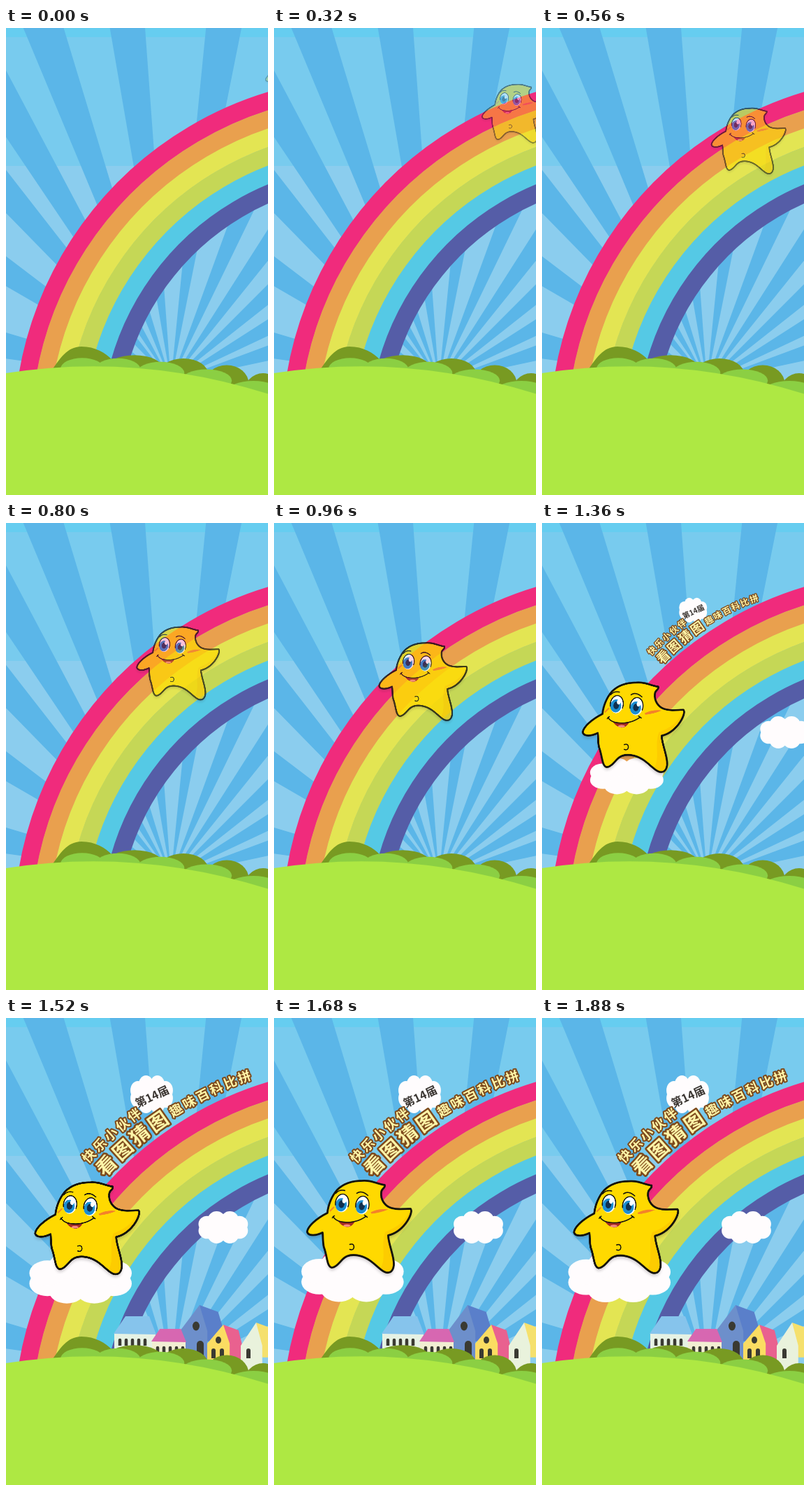
An HTML page with a canvas that plays this animation: 375 px wide and 667 px high, repeating every 3840 ms.

```html
<!DOCTYPE html>
<html lang="zh">
<head>
<meta charset="utf-8">
<style>
html, body { margin: 0; width: 100%; height: 100%; overflow: hidden; background: #78cbee; }
canvas { display: block; width: 375px; height: 667px; }
</style>
</head>
<body>
<canvas id="stage"></canvas>
<script>
const W = 375, H = 667, LOOP = 3840, STEP = 40, END = 1880;
const dpr = window.devicePixelRatio || 1;
const stage = document.getElementById('stage');
stage.width = W * dpr;
stage.height = H * dpr;
const ctx = stage.getContext('2d');
const HUB = { x: 236, y: 505 };
const BOW = { x: 522, y: 581, r: 511, band: 24.9 };
const INK = '#14130c';
const FONT = '"Noto Sans CJK SC", "Noto Sans CJK", "Noto Sans CJK JP", sans-serif';

const rad = deg => deg * Math.PI / 180;
const ramp = (t, from, to) => Math.min(1, Math.max(0, (t - from) / (to - from)));
const ground = x => 483 + 0.00063 * (x - 125) ** 2;

function layer(w, h, scale, paint) {
  const c = document.createElement('canvas');
  c.width = w * scale;
  c.height = h * scale;
  const g = c.getContext('2d');
  g.scale(scale, scale);
  paint(g);
  return c;
}

function shape(g, color, d) {
  g.fillStyle = color;
  g.fill(new Path2D(d));
}

function line(g, color, width, d) {
  g.strokeStyle = color;
  g.lineWidth = width;
  g.stroke(new Path2D(d));
}

function oval(g, color, x, y, rx, ry, turn = 0) {
  g.fillStyle = color;
  g.beginPath();
  g.ellipse(x, y, rx, ry, turn, 0, Math.PI * 2);
  g.fill();
}

function placed(g, x, y, scale, turn, paint) {
  g.save();
  g.translate(x, y);
  g.rotate(turn);
  g.scale(scale, scale);
  paint();
  g.restore();
}

function sky(g) {
  g.fillStyle = '#8bcdee';
  g.fillRect(0, 0, W, H);
  g.fillStyle = '#78cbee';
  g.fillRect(0, 0, W, 197);
  g.fillStyle = '#66cdf0';
  g.fillRect(0, 0, W, 13);
  const rays = [-77.8, -56.4, -41.2, -31, -19.8, -7, 8.5];
  for (let a = 23; a < 80; a += 12.7) rays.push(a);
  g.fillStyle = '#5bb6e8';
  for (const a of rays) {
    const half = 2.8 + a * a / 4000;
    g.beginPath();
    g.moveTo(HUB.x, HUB.y);
    g.arc(HUB.x, HUB.y, 900, rad(a - half - 90), rad(a + half - 90));
    g.fill();
  }
}

function rainbow(g) {
  const colors = ['#f02b7c', '#e9a04e', '#e3e553', '#c5d756', '#55c9e5', '#555da7'];
  g.lineWidth = BOW.band + 0.4;
  colors.forEach((color, i) => {
    g.strokeStyle = color;
    g.beginPath();
    g.arc(BOW.x, BOW.y, BOW.r - BOW.band * (i + 0.5), Math.PI * 0.95, Math.PI * 1.6);
    g.stroke();
  });
}

function land(g) {
  shape(g, '#789a22', 'M66 488C78 472 86 456 108 455C128 455 142 464 152 474V490Z');
  for (const x of [184, 254, 316, 368])
    oval(g, '#789a22', x, ground(x) + 2, 54 - x / 14, 20 + (x - 184) / 20);
  for (const x of [109, 160, 221, 287, 354])
    oval(g, '#8bcf43', x, ground(x) + 4, 28 + x / 35, 16);
  shape(g, '#aee843', 'M0 493Q187.5 463.5 375 522.5V667H0Z');
}

function houses(g) {
  const hole = '#3a3a32';
  const arch = (x, y, w, h) => {
    g.fillStyle = hole;
    g.beginPath();
    g.arc(x, y, w / 2, Math.PI, 0);
    g.lineTo(x + w / 2, y + h);
    g.lineTo(x - w / 2, y + h);
    g.fill();
  };
  // Long house: slanted roof over a row of windows
  const terrace = (x, y, w, rise, wall, roof) => {
    shape(g, wall, `M${x} ${y}h${w}v40h${-w}Z`);
    shape(g, roof, `M${x - 1} ${y + 1}l${rise * 0.68} ${-rise}h${w - rise}L${x + w + 1} ${y + 2}Z`);
    for (let i = 0; i < 5; i++) arch(x + 8 + i * 9, y + 10, 4.5, 8);
  };
  // Gabled front with the roof running off to the right
  const gable = (x, y, w, drop, wall, roof) => {
    shape(g, roof, `M${x} ${y}l${w * 0.95} ${w * 0.35}l${w * 0.45} 42H${x + w * 0.4}Z`);
    shape(g, wall, `M${x} ${y}l${-w} ${drop}v50h${w * 1.4}v-50Z`);
  };
  gable(277, 410, 28, 37, '#6d8fcb', '#5a7fca');
  terrace(155, 450, 59, 25, '#e6f2e4', '#86c4ec');
  terrace(209, 461, 48, 18, '#f2eed2', '#d767b1');
  gable(311, 438, 23, 27, '#fbdc62', '#e9618f');
  gable(358, 435, 22, 33, '#e9f2dc', '#f5e06d');
  oval(g, hole, 272, 440, 5, 6.5);
  oval(g, hole, 304, 460, 4, 5);
  arch(278, 466, 10, 16);
  for (const x of [297, 309, 347]) arch(x, 475, 6, 11);
}

function cloud(g, x, y, w, h) {
  const puffs = 8;
  oval(g, '#fffcfd', x, y, w * 0.4, h * 0.4);
  for (let i = 0; i < puffs; i++) {
    const a = (i + 0.5) * 2 * Math.PI / puffs;
    oval(g, '#fffcfd', x + w * 0.35 * Math.cos(a), y + h * 0.27 * Math.sin(a), w * 0.175, h * 0.25);
  }
}

function arcText(g, text, radius, from, step, size, edge) {
  g.font = `900 ${size}px ${FONT}`;
  g.lineWidth = edge;
  for (const pass of ['strokeText', 'fillText']) {
    [...text].forEach((ch, i) => {
      const a = rad(from + step * i);
      placed(g, BOW.x + radius * Math.sin(a), BOW.y - radius * Math.cos(a), 1, a, () => g[pass](ch, 0, 0));
    });
  }
}

function title(g) {
  cloud(g, 208.5, 109, 61, 54);
  g.textAlign = 'center';
  g.textBaseline = 'middle';
  g.lineJoin = 'round';
  g.fillStyle = '#3b3632';
  g.font = `bold 16px ${FONT}`;
  placed(g, 209, 112, 1, -0.44, () => g.fillText('第14届', 0, 0));
  g.strokeStyle = '#7d4a1c';
  g.fillStyle = '#fff5a8';
  arcText(g, '快乐小伙伴', 557, -46.4, 2.25, 18.5, 4);
  arcText(g, '趣味百科比拼', 529, -31.8, 2.36, 18.5, 4);
  arcText(g, '看图猜图', 530, -45.6, 3.5, 28, 5);
}

function eye(g, x, y) {
  placed(g, x, y, 1, 0.15, () => {
    oval(g, '#fff', 0, 0, 9.5, 13);
    oval(g, '#1c8ed2', -1, 2.5, 8, 9.5);
    oval(g, '#12304f', -0.5, 1.5, 4.2, 5.5);
    oval(g, '#fff', 2.5, -4, 2.8, 3.8);
    g.strokeStyle = INK;
    g.lineWidth = 1.4;
    g.beginPath();
    g.ellipse(0, 0, 9.5, 13, 0, Math.PI * 0.9, Math.PI * 2.1);
    g.stroke();
  });
}

function star(g) {
  const body = new Path2D('M125 233C139 232 147 238 157 239C158 244 152 244 152 250C151 260 157 268 164 271' +
    'C174 275 185 273 194 273C197 276 193 286 187 294C180 303 171 309 162 311C162 322 171 342 170 354' +
    'C169 362 165 365 159 364C149 361 140 346 124 341C114 338 104 338 97 345C92 350 87 357 81 357' +
    'C74 355 75 341 70 328C68 320 69 312 68 307C60 311 48 313 46 306C47 298 59 287 75 279' +
    'C76 268 81 255 89 246C98 237 111 233 125 233Z');
  g.lineCap = g.lineJoin = 'round';
  g.save();
  g.shadowColor = 'rgba(60, 50, 60, 0.25)';
  g.shadowBlur = 8 * dpr;
  g.shadowOffsetY = 8 * dpr;
  g.fillStyle = '#ffd900';
  g.fill(body);
  g.restore();
  g.save();
  g.clip(body);
  shape(g, '#fdcc00', 'M196 272C185 294 172 300 158 306C151 324 160 344 151 358L166 370L176 350L164 312L200 290Z');
  g.restore();
  line(g, '#f08a20', 2, 'M84 271l-5 5');
  shape(g, '#f4822a', 'M137 278Q149 272 162 274Q150 279 138 280Z');
  eye(g, 96, 265);
  eye(g, 125, 268);
  line(g, INK, 1.5, 'M87 251Q92 245 100 247M117 251Q124 246 133 254');
  shape(g, '#a52c23', 'M90 290Q103 295 115 290Q110 300 102 299Q94 297 90 290Z');
  oval(g, '#f58b82', 103, 297, 5, 1.8);
  line(g, INK, 1.5, 'M83 284Q87 291 98 292Q116 294 130 284M82 286l3 -3M128 282l4 3');
  line(g, INK, 1.5, 'M107 324Q113 322 113 328Q112 333 107 331');
  g.strokeStyle = INK;
  g.lineWidth = 2.8;
  g.stroke(body);
}

const REST = { x: 120.5, y: 298.5 }, BOX = { w: 164, h: 152 };
const backdrop = layer(W, H, dpr, g => { sky(g); rainbow(g); });
const front = layer(W, H, dpr, land);
const village = layer(W, H, dpr, houses);
const starArt = layer(BOX.w, BOX.h, dpr * 2, g => {
  g.translate(BOX.w / 2 - REST.x, BOX.h / 2 - REST.y);
  star(g);
});

// Steady slide down the rainbow, then a damped wobble at rest
function starPose(t) {
  const landing = 1465;
  if (t < landing) return { x: 411 - 0.206 * t, y: Math.min(70 + 0.163 * t, 302.5) };
  const u = t - landing;
  const sway = -10 * Math.exp(-u / 110) * Math.cos(u / 70);
  return { x: REST.x + sway, y: REST.y - 0.4 * sway };
}

function draw(t) {
  ctx.setTransform(dpr, 0, 0, dpr, 0, 0);
  ctx.drawImage(backdrop, 0, 0, W, H);

  const rise = ramp(t, 1360, 1500);
  ctx.globalAlpha = rise;
  ctx.drawImage(village, 0, 25 * (1 - rise), W, H);
  ctx.globalAlpha = 1;
  ctx.drawImage(front, 0, 0, W, H);

  cloud(ctx, 292.5 + 0.23 * Math.max(0, 1600 - t), 299, 71, 46);

  const grow = ramp(t, 1140, 1475);
  if (grow > 0) placed(ctx, 231, 154, grow, 0, () => {
    ctx.translate(-231, -154);
    title(ctx);
  });

  const { x, y } = starPose(t);
  const puff = ramp(t, 1120, 1455);
  if (puff > 0) cloud(ctx, x - 9.5, y + 66 + 5.5 * puff, 147 * puff, 72 * puff);
  ctx.globalAlpha = 0.25 + 0.75 * ramp(t, 0, 1300);
  placed(ctx, x, y, 0.53 + 0.47 * ramp(t, 0, 1440), 0,
    () => ctx.drawImage(starArt, -BOX.w / 2, -BOX.h / 2, BOX.w, BOX.h));
  ctx.globalAlpha = 1;
}

const start = performance.now();
function frame() {
  const t = (performance.now() - start) % LOOP;
  draw(Math.min(END, Math.floor(t / STEP) * STEP));
  requestAnimationFrame(frame);
}
frame();
</script>
</body>
</html>
```
